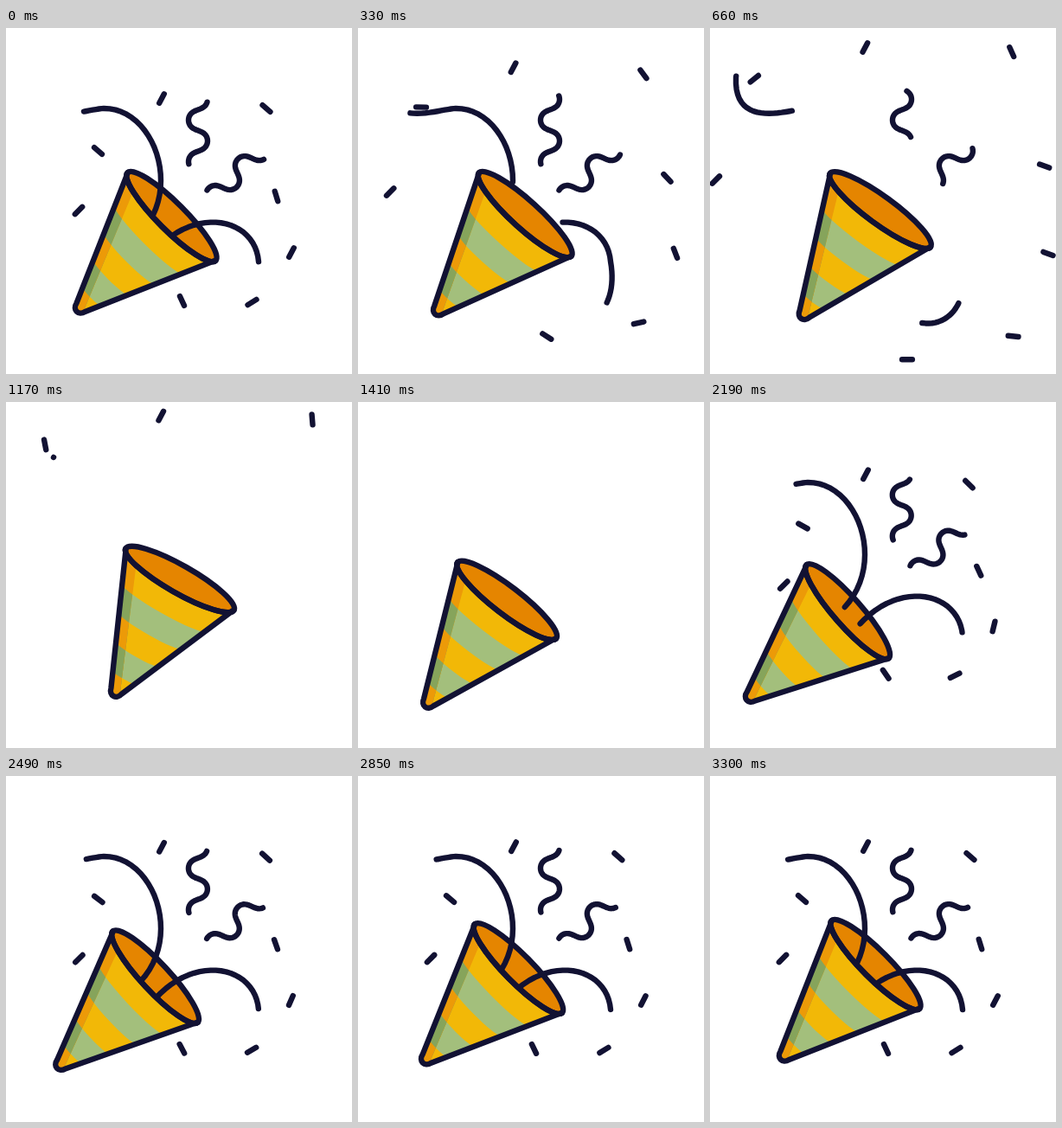
Write an HTML page with a canvas that moves like this. It is 400 by 400 pixels and loops after 5.33 s.

```html
<!DOCTYPE html>
<html lang="en">
<head>
<meta charset="utf-8">
<title>Party popper</title>
<style>
  html, body { margin: 0; width: 100%; height: 100%; overflow: hidden; background: #fff; }
  canvas { display: block; width: 100vw; height: 100vh; }
</style>
</head>
<body>
<canvas id="stage"></canvas>
<script>
const LOOP = 5330, STEP = 30;
const LEAN = 1200, BURST = 1500, RECOIL = 1650, SETTLE = 1710, HOME = 3270;
const INK = '#121233', MOUTH = '#e58500';
const LIGHT = ['#f2b807', '#a3bf7c'], SHADE = ['#ec9a08', '#86a45b'];
const ORIGIN = [182, 256];

const canvas = document.getElementById('stage');
const ctx = canvas.getContext('2d');

const clamp = v => Math.max(0, Math.min(1, v));
const mix = (a, b, k) => a + (b - a) * k;
const mixAll = (a, b, k) => a.map((v, i) => mix(v, b[i], k));
const span = (t, from, to) => clamp((t - from) / (to - from));
const smooth = u => u * u * (3 - 2 * u);
const ease = (t, from, to) => smooth(span(t, from, to));
const rad = deg => deg * Math.PI / 180;

// How far the confetti still is from rest after the burst: 1 down to 0.
const lagAt = t => Math.exp(-.004 * Math.max(0, t - SETTLE));
const burstAt = t => 1 - (1 - span(t, BURST, SETTLE)) ** 2;

// Cone poses: mouth centre x and y, turn in degrees
const REST = [192.5, 217, 0], LEANING = [201.7, 203.7, -15.4], KICKED = [138, 258, 2.2];

function coneAt(t) {
  if (t < LEAN) return mixAll(REST, LEANING, ease(t, 0, LEAN));
  if (t < RECOIL) return mixAll(LEANING, KICKED, ease(t, LEAN, RECOIL));
  const k = Math.sin(Math.PI / 2 * span(t, RECOIL, HOME) ** 1.2);
  const [x, y, turn] = mixAll(KICKED, REST, k);
  return [x, y, turn + 17 * k * (1 - k) ** 2];
}

function bezier(p, steps = 24) {
  return Array.from({ length: steps + 1 }, (_, i) => {
    const u = i / steps, w = 1 - u;
    return [0, 1].map(c => w ** 3 * p[0][c] + 3 * w * w * u * p[1][c]
      + 3 * w * u * u * p[2][c] + u ** 3 * p[3][c]);
  });
}

// A meandering wave, 92 long, drawn upwards and then turned.
function wave(cx, cy, turn) {
  const cos = Math.cos(rad(turn)), sin = Math.sin(rad(turn));
  return Array.from({ length: 81 }, (_, i) => {
    const s = 46 - 92 * i / 80, phase = Math.PI * (s + 38) / 24;
    const x = 11 * Math.cos(phase), y = s + 1.8 * Math.sin(2 * phase);
    return [cx + x * cos - y * sin, cy + x * sin + y * cos];
  });
}

const lengthOf = pts => pts.slice(1).reduce(
  (sum, p, i) => sum + Math.hypot(p[0] - pts[i][0], p[1] - pts[i][1]), 0);

// rest: visible part of the curve; tail, head: when each end runs off;
// late: how much the head lags after the burst; pull: shift towards the origin
const streamer = {
  rest: [0, .603], pull: 0
};
const squiggle = {
  rest: [.11, .89], tail: [330, 1150], head: [0, 660], late: .22, pull: .04
};
const RIBBONS = [
  {
    ...streamer, tail: [0, 1180], head: [0, 1100], late: .32,
    pts: [
      ...bezier([[155, 238], [205, 185], [170, 92], [113, 93]]),
      ...bezier([[113, 93], [95, 93], [27, 120], [30, 57]]),
      ...bezier([[30, 57], [31, 40], [70, 40], [55, 64]])
    ]
  },
  {
    ...streamer, tail: [0, 930], head: [0, 680], late: .17,
    pts: [
      ...bezier([[173, 257], [220, 205], [288, 220], [292, 270]]),
      ...bezier([[292, 270], [300, 315], [278, 346], [245, 341]])
    ]
  },
  { ...squiggle, pts: wave(222, 120.5, 0) },
  { ...squiggle, pts: wave(266, 169, 45) }
].map(r => ({ ...r, length: lengthOf(r.pts) }));

// x, y, angle, spin, reach; in the order in which they vanish
const DASHES = [
  [84, 211, 135, 0, 85], [330, 259.5, 118, -98, 61], [312.5, 194.5, 73, -53, 82],
  [203.5, 315.5, 65, -65, 72], [284.5, 317, 148, 38, 77], [106.5, 142, 41, -80, 100],
  [301, 93, 41, 25, 81], [180, 81.5, 118, 0, 59]
];

function drawRibbon(r, t) {
  let [tail, head] = r.rest, pull = 0;
  if (t < BURST) {
    tail = mix(tail, 1, ease(t, ...r.tail));
    head = mix(head, 1, ease(t, ...r.head));
  } else {
    const lag = lagAt(t);
    tail = mix(tail, .025, lag);
    head *= (1 - r.late * lag) * burstAt(t);
    pull = r.pull * lag;
  }
  if (tail >= head) return;
  ctx.save();
  ctx.setLineDash([(head - tail) * r.length, 2 * r.length]);
  ctx.lineDashOffset = -tail * r.length;
  ctx.beginPath();
  r.pts.forEach(p => ctx.lineTo(...mixAll(p, ORIGIN, pull)));
  ctx.stroke();
  ctx.restore();
}

function drawDash([x, y, angle, spin, reach], i, t) {
  const rx = x - ORIGIN[0], ry = y - ORIGIN[1];
  let scale, turn;
  if (t < BURST) {
    if (t > 700 + 100 * i) return;
    const k = smooth(span(t, 0, 950) ** .6) / .9;
    scale = 1 + reach * k / Math.hypot(rx, ry);
    turn = t / 660;
  } else {
    turn = lagAt(t);
    scale = (1 - .09 * turn) * burstAt(t);
  }
  const a = rad(angle + spin * turn), dx = 5.9 * Math.cos(a), dy = 5.9 * Math.sin(a);
  const px = ORIGIN[0] + rx * scale, py = ORIGIN[1] + ry * scale;
  ctx.beginPath();
  ctx.moveTo(px - dx, py - dy);
  ctx.lineTo(px + dx, py + dy);
  ctx.stroke();
}

function inCone([x, y, turn], draw) {
  ctx.save();
  ctx.translate(x, y);
  ctx.rotate(rad(45 + turn));
  draw();
  ctx.restore();
}

function mouthPath() {
  ctx.beginPath();
  ctx.ellipse(0, 1.5, 72, 16, 0, 0, Math.PI * 2);
}

function bodyPath() {
  ctx.beginPath();
  ctx.ellipse(0, 1.5, 72, 16, 0, 0, Math.PI);
  ctx.lineTo(-71, 3);
  ctx.lineTo(-7, 150);
  ctx.bezierCurveTo(-5, 159, 5, 159, 7, 150);
  ctx.lineTo(71, 3);
  ctx.closePath();
}

function bands(colors) {
  for (let i = 0; i < 5; i++) {
    const v = i && 8 + 31 * i, k = 1 - v / 166;
    ctx.fillStyle = colors[i % 2];
    ctx.beginPath();
    ctx.ellipse(0, v, 72 * k, 9 * k, 0, 0, Math.PI);
    ctx.lineTo(-12, 170);
    ctx.lineTo(12, 170);
    ctx.closePath();
    ctx.fill();
  }
}

function drawBody() {
  ctx.save();
  bodyPath();
  ctx.clip();
  bands(LIGHT);
  ctx.beginPath();
  [[-80, 0], [-57, 0], [5, 150], [5, 165], [-20, 165]].forEach(p => ctx.lineTo(...p));
  ctx.clip();
  bands(SHADE);
  ctx.restore();
  bodyPath();
  ctx.stroke();
  mouthPath();
  ctx.stroke();
}

function render(t) {
  const dpr = window.devicePixelRatio || 1;
  const w = Math.round(innerWidth * dpr), h = Math.round(innerHeight * dpr);
  if (canvas.width !== w || canvas.height !== h) {
    canvas.width = w;
    canvas.height = h;
  }
  ctx.setTransform(w / 400, 0, 0, h / 400, 0, 0);
  ctx.fillStyle = '#fff';
  ctx.fillRect(0, 0, 400, 400);
  ctx.strokeStyle = INK;
  ctx.lineWidth = 6.4;
  ctx.lineCap = ctx.lineJoin = 'round';

  const cone = coneAt(t);
  inCone(cone, () => {
    ctx.fillStyle = MOUTH;
    mouthPath();
    ctx.fill();
  });
  RIBBONS.forEach(r => drawRibbon(r, t));
  DASHES.forEach((d, i) => drawDash(d, i, t));
  inCone(cone, drawBody);
}

const start = performance.now();
function tick() {
  const t = (performance.now() - start) % LOOP;
  render(Math.floor(t / STEP) * STEP);
  requestAnimationFrame(tick);
}
tick();
</script>
</body>
</html>
```
